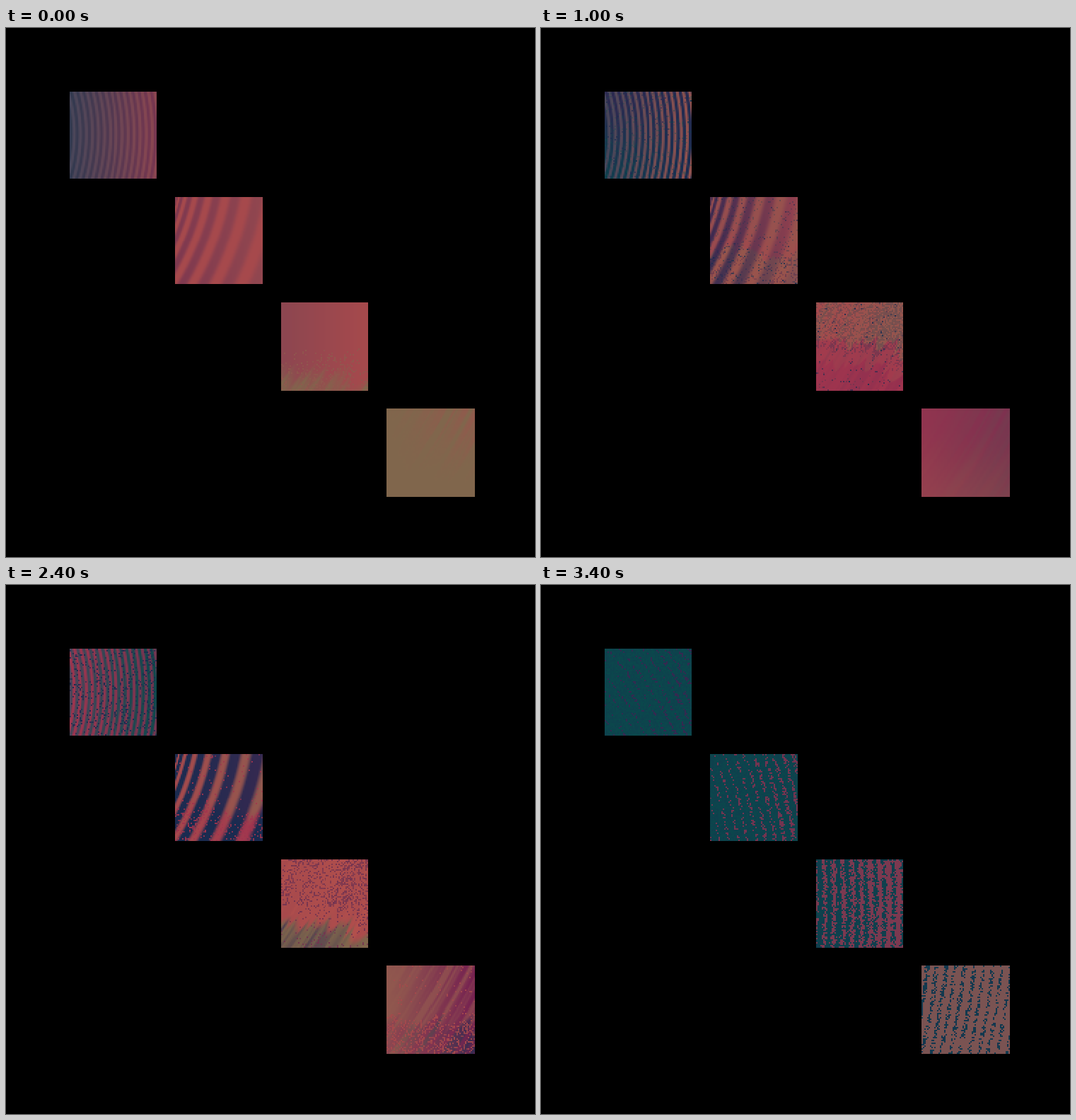
An HTML page with a canvas that plays this animation: 748 px wide and 748 px high, repeating every 3.6 s.

```html
<!DOCTYPE html>
<html>
<head>
<meta charset="utf-8">
<style>
html, body { margin: 0; width: 100%; height: 100%; overflow: hidden; background: #000; }
canvas { display: block; width: 100vw; height: 100vh; }
</style>
</head>
<body>
<canvas id="stage" width="748" height="748"></canvas>
<script>
const STEP = 200, STEPS = 18, N = 62;
const KEY_STEPS = [0, 4, 7, 9, 12, 14, 17];
const BOXES = [[90, 90, 123, 123], [239, 239, 124, 123], [389, 388, 123, 125], [538, 538, 125, 125]];

const HEX = {
  t: '#0a494c', n: '#1a2b50', d: '#2e384e', p: '#352950', s: '#48465a', m: '#752050', u: '#743450',
  c: '#a0344e', r: '#a6494c', e: '#b4504c', k: '#8c4650', w: '#90584e', b: '#80664c', o: '#79714c'
};
const RGB = {};
for (const k in HEX) RGB[k] = [1, 3, 5].map(i => parseInt(HEX[k].slice(i, i + 2), 16));

// corner colours (TL TR BL BR), stripe corner colours, speck colour,
// edge height, edge softness, stripe strength, specks above, specks below
const LOOKS = [
  [
    ['sksk', 'dudu', 'd', .5, 1, .9, 0, 0],
    ['swsw', 'pntn', 'n', .5, 1, 1.1, .03, .02],
    ['srsr', 'npnn', 't', .5, 1, 1.1, .08, .08],
    ['scsc', 'ppnp', 'u', .5, 1, 1, .1, .06],
    ['cucu', 'stst', 'n', .5, 1, 1, .12, .12],
    ['kkwk', 'upsn', 'c', .5, 1, 1, .2, .2]
  ],
  [
    ['rrrr', 'ukuk', 'u', .5, 1, .8, 0, 0],
    ['wwrr', 'pkpk', 'n', .6, .6, 1, .01, .05],
    ['crbb', 'pcpb', 'n', .64, .05, .85, .08, .16],
    ['crbw', 'nupu', 'c', .68, .3, 1, .03, .17],
    ['rwrc', 'npnn', 'c', .65, .2, 1.3, .03, .17],
    ['wwwr', 'pptt', 'u', .65, .1, 1.7, .1, .16]
  ],
  [
    ['krbb', 'krkr', 'w', .9, .3, .5, 0, .1],
    ['rwcc', 'owuc', 'n', .52, .04, .5, .03, .02],
    ['rrcc', 'kwcm', 'd', .76, .04, .7, .42, .02],
    ['rrcc', 'krrc', 'c', .78, .05, .6, .25, .05],
    ['rebb', 'erpb', 'u', .8, .15, .8, .25, .05],
    ['wwob', 'krnm', 'e', .6, .12, 1.1, .4, .08]
  ],
  [
    ['bbbb', 'brbb', 'b', .4, 1, .5, 0, 0],
    ['ccrr', 'ckrw', 'r', .7, 1, .5, 0, 0],
    ['upud', 'udup', 'u', .5, 1, .6, 0, 0],
    ['cccu', 'cucu', 'c', .6, 1, .4, 0, 0],
    ['wkwp', 'wmkm', 'r', .66, .15, 1, .03, .25],
    ['obwu', 'omru', 'e', .65, .12, 1, .03, .35]
  ]
];

const clamp = v => Math.max(0, Math.min(1, v));
const smooth = v => (v = clamp(v), v * v * (3 - 2 * v));
const fract = v => v - Math.floor(v);
const lerp = (a, b, f) => a + (b - a) * f;
const mix = (a, b, f) => a.map((v, i) => lerp(v, b[i], f));
const hash = (x, y) => fract(Math.sin(x * 127.1 + y * 311.7) * 43758.5453);
const valley = turns => .5 - .5 * Math.cos(turns * Math.PI * 2);

function noise(v, seed) {
  const i = Math.floor(v);
  return lerp(hash(i, seed), hash(i + 1, seed), smooth(v - i));
}

function corners(name, u, v) {
  const [a, b, c, d] = [...name].map(k => RGB[k]);
  return mix(mix(a, b, u), mix(c, d, u), v);
}

function stripe(tile, r) {
  if (tile === 0) return smooth(valley((r - 300) / 8.5));
  // stripes that widen outwards
  if (tile === 1) return smooth(valley((Math.sqrt(Math.max(20, 121 + 10 * (r - 374))) - 11) / 5));
  const streak = .6 * noise(r / 7, 3) + .4 * noise(r / 3, 8);
  return smooth(.5 + 1.8 * (streak - .5));
}

// Streaks along wide circles centred far to the left of the tiles
function arcColor(tile, key, i, j, x, y) {
  const [base, bands, speck, edge, soft, strength, above, below] = LOOKS[tile][key];
  const u = (i + .5) / N, v = (j + .5) / N;
  const r = Math.hypot(x + 110, y - 150);
  const grain = hash(i + key * 71, j + tile * 97);
  const jag = .18 * (noise(r / 13, 5) - .5) + .15 * (noise(r / 4, 6) - .5);
  const low = smooth((v - edge + jag) / soft + .5);
  const dark = clamp(strength * stripe(tile, r));
  let col = mix(corners(base, u, low), corners(bands, u, low), dark);
  const cut = smooth((v - Math.min(edge, .62) + jag) / .08 + .5);
  const density = lerp(above, below, cut) * (.35 + 1.3 * noise(r / 9, 12));
  if (grain < density) col = mix(col, RGB[speck], .6 + .4 * hash(j, i));
  return col;
}

// Ragged fine stripes of the closing picture
function raggedColor(tile, i, j, x, y) {
  const u = (i + .5) / N;
  const r = Math.hypot(x + 300, y - 450);
  const fill = [.1, .12, .38, .66][tile] + [.16, .24, .24, .1][tile] * u;
  const grain = hash(i + 13, j + tile * 41);
  const on = valley(r / 13) * .45 + grain * .55 < fill;
  const ink = [RGB.p, RGB.u, mix(RGB.u, RGB.k, .3), mix(RGB.s, RGB.w, .7)][tile];
  const ground = mix(RGB.t, RGB.n, [0, .05, .15, .4][tile] + .3 * hash(j, i));
  return on ? ink : ground;
}

function paint(tile, key) {
  const [bx, by, w, h] = BOXES[tile], out = new Float32Array(N * N * 3);
  for (let j = 0; j < N; j++) for (let i = 0; i < N; i++) {
    const x = bx + (i + .5) * w / N, y = by + (j + .5) * h / N;
    const col = key < 6 ? arcColor(tile, key, i, j, x, y) : raggedColor(tile, i, j, x, y);
    out.set(col, (j * N + i) * 3);
  }
  return out;
}

const pictures = BOXES.map((_, tile) => KEY_STEPS.map((_, key) => paint(tile, key)));
const ctx = document.getElementById('stage').getContext('2d');
const small = document.createElement('canvas');
small.width = small.height = N;
const smallCtx = small.getContext('2d');
const img = smallCtx.createImageData(N, N);
ctx.imageSmoothingEnabled = false;

function draw(step) {
  let k = 0;
  while (k < 5 && step >= KEY_STEPS[k + 1]) k++;
  const f = (step - KEY_STEPS[k]) / (KEY_STEPS[k + 1] - KEY_STEPS[k]);
  ctx.fillStyle = '#000';
  ctx.fillRect(0, 0, 748, 748);
  BOXES.forEach((box, tile) => {
    const a = pictures[tile][k], b = pictures[tile][k + 1];
    for (let p = 0; p < N * N; p++) {
      for (let c = 0; c < 3; c++) img.data[p * 4 + c] = lerp(a[p * 3 + c], b[p * 3 + c], f);
      img.data[p * 4 + 3] = 255;
    }
    smallCtx.putImageData(img, 0, 0);
    ctx.drawImage(small, ...box);
  });
}

let shown = -1;
const start = performance.now();
function tick() {
  const step = Math.floor((performance.now() - start) / STEP) % STEPS;
  if (step !== shown) draw(shown = step);
  requestAnimationFrame(tick);
}
tick();
</script>
</body>
</html>
```
